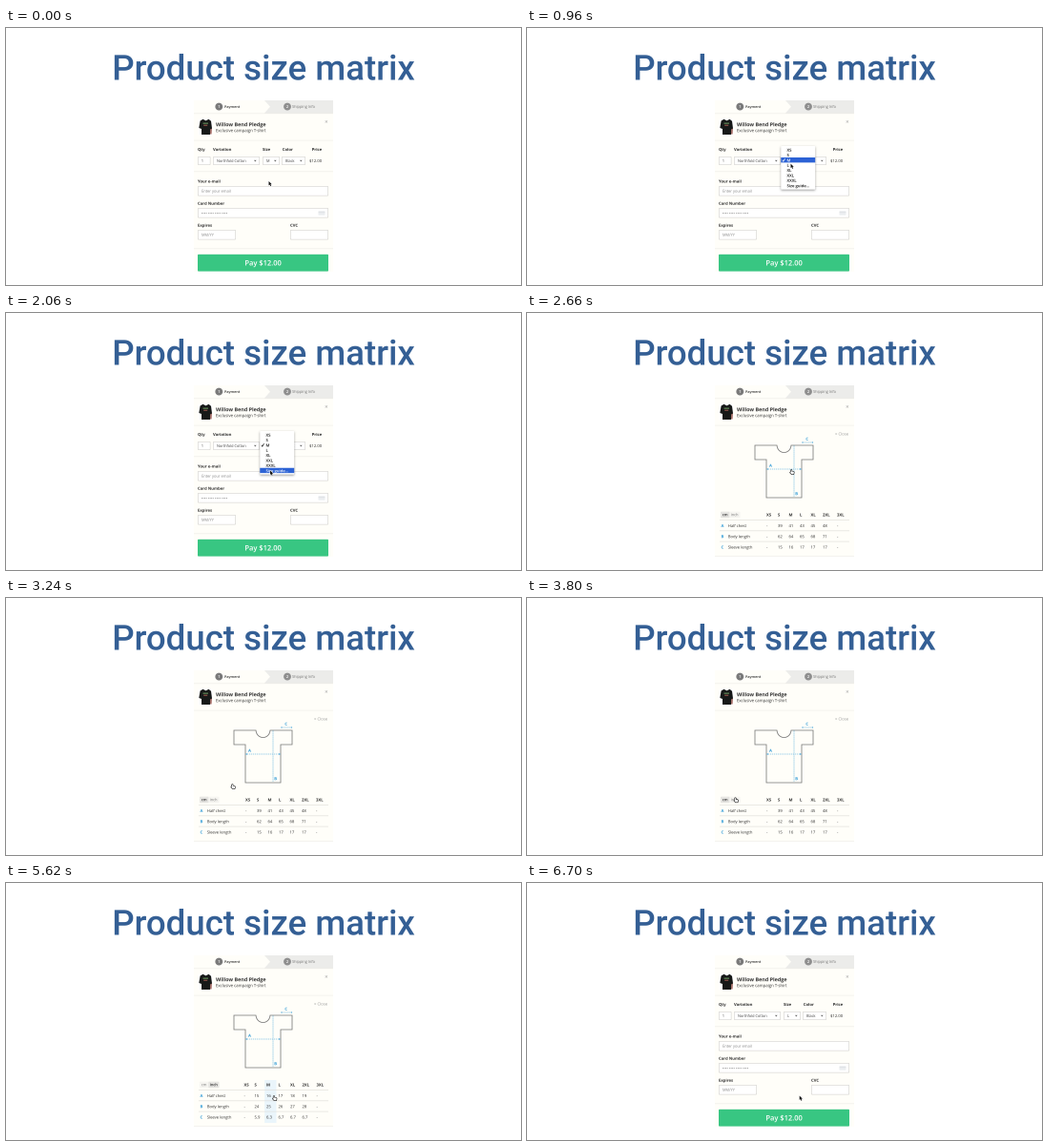
Animation of 540 by 270 pixels, one loop 6720 ms. Source, as an HTML page with a canvas:

```html
<!DOCTYPE html>
<html lang="en">
<head>
<meta charset="utf-8">
<title>Product size matrix</title>
<style>
html, body { margin: 0; width: 100%; height: 100%; overflow: hidden; background: #fff; }
canvas { display: block; }
</style>
</head>
<body>
<canvas id="stage" width="540" height="270"></canvas>
<script>
// Everything is drawn four times larger and reduced, which keeps the tiny text soft and even.
const SCALE = 4;
const stage = document.getElementById('stage').getContext('2d');
const large = document.createElement('canvas');
large.width = 540 * SCALE;
large.height = 270 * SCALE;
const ctx = large.getContext('2d');
ctx.scale(SCALE, SCALE);
stage.imageSmoothingQuality = 'high';

const LOOP = 6720, OPEN_LIST = 720, OPEN_GUIDE = 2300, TO_INCH = 4300, CLOSE_GUIDE = 6240;
const INK = '#303030', GREY = '#858585', LINE = '#d9d8d5', RULE = '#eeece7', CREAM = '#fffef9', BLUE = '#2f9bd8';

// Cursor tip: time, x, y
const PATH = [
  [0, 275.5, 161], [180, 276, 160], [620, 277.5, 139], [800, 277, 140], [960, 276.5, 142.6],
  [1380, 277, 145], [1980, 277, 165.5], [2480, 277, 165.5], [2660, 276.5, 164.8],
  [2800, 276, 165], [3440, 225, 205], [3700, 217.8, 210], [4350, 217.8, 210],
  [4760, 240, 222], [5400, 269, 224], [5620, 280.3, 223.8], [5980, 285.7, 223.5], [LOOP, 285.7, 223.5]
];

const LIST = ['XS', 'S', 'M', 'L', 'XL', 'XXL', 'XXXL', 'Size guide...'];
const HEADS = ['XS', 'S', 'M', 'L', 'XL', '2XL', '3XL'];
const ROWS = ['Half chest', 'Body length', 'Sleeve length'];
const UNITS = {
  cm: {
    cols: [251, 263, 274.5, 286, 297.5, 310, 325],
    rows: ['- 39 41 43 45 48 -', '- 62 64 65 68 71 -', '- 15 16 17 17 17 -']
  },
  inch: {
    cols: [249.5, 260.5, 273, 285.5, 298, 310.5, 325.5],
    rows: ['- 15 16 17 18 19 -', '- 24 25 26 27 28 -', '- 5.9 6.3 6.7 6.7 6.7 -']
  }
};

// Laying text out at ten times its size keeps the advances exact.
function text(str, x, y, size = 4.1, color = INK, weight = 400, align = 'left', family = 'Open Sans') {
  ctx.save();
  ctx.translate(x, y);
  ctx.scale(.1, .1);
  ctx.font = `${weight} ${size * 10}px "${family}", sans-serif`;
  ctx.textAlign = align;
  ctx.fillStyle = color;
  ctx.fillText(str, 0, 0);
  ctx.restore();
}
const bold = (str, x, y, color = INK) => text(str, x, y, 4.2, color, 700);

function rect(x, y, w, h, color, r = 0) {
  ctx.fillStyle = color;
  ctx.beginPath();
  ctx.roundRect(x, y, w, h, r);
  ctx.fill();
}
const rule = y => rect(197, y, 146, .6, RULE);

function shape(d, fill, stroke, width = 1, dash = []) {
  const p = new Path2D(d);
  ctx.lineWidth = width;
  ctx.setLineDash(dash);
  if (stroke) { ctx.strokeStyle = stroke; ctx.stroke(p); }
  if (fill) { ctx.fillStyle = fill; ctx.fill(p); }
  ctx.setLineDash([]);
}

function box(x, y, w, h) {
  rect(x, y, w, h, LINE, 1);
  rect(x + .7, y + .7, w - 1.4, h - 1.4, '#fff', .6);
}

function select(x, w, value) {
  box(x, 135, w, 9);
  text(value, x + 4, 141, 3.85, '#444');
  shape(`M${x + w - 6} 138.8h2.6l-1.3 1.7z`, '#666');
}

function badge(n, x, color) {
  ctx.fillStyle = color;
  ctx.beginPath();
  ctx.arc(x, 82.6, 3.9, 0, 7);
  ctx.fill();
  text(n, x, 84.1, 4, '#fff', 600, 'center');
}

function photo() {
  rect(201.5, 95.5, 15, 17, '#fff');
  shape('M212 105H216L215.6 111.5H212.5z', '#a8716a');
  shape('M206.5 95.8L203.6 97.5 202.3 105 205 106V112H214V106.5L216 105.5 215 97.8 212.5 95.8 209.5 97.4z', '#171918');
  rect(206.5, 99.5, 5.5, 1.4, '#55774c');
  rect(207.2, 101.6, 4, 1.4, '#7b4a40');
}

function header() {
  text('Product size matrix', 270, 54.4, 36.6, '#345f95', 500, 'center', 'Roboto');
  rect(197, 76, 146, 180, CREAM);
  shape('M271 76H343V89.5H271L277 82.7z', '#ececea');
  rule(89.5);
  badge('1', 223.3, '#7a7a7a');
  text('Payment', 229, 84.1, 3.8, INK, 600);
  badge('2', 295, '#8f8f8f');
  text('Shipping Info', 300, 84.1, 3.9, '#777');
  photo();
  text('Willow Bend Pledge', 220, 103.2, 5.4, '#333', 700);
  text('Exclusive campaign T-shirt', 220, 109.2, 4.3);
  text('×', 334.2, 100.6, 6, '#999');
  rule(117.8);
}

function form(size) {
  [['Qty', 201, 129], ['Variation', 217, 129], ['Size', 269, 129], ['Color', 289.8, 129],
   ['Price', 320.7, 129], ['Your e-mail', 201, 162.5], ['Card Number', 201, 185.7],
   ['Expires', 201, 208.8], ['CVC', 298, 208.8]].forEach(l => bold(...l));
  box(201, 135, 13.5, 9);
  text('1', 204.8, 141, 3.9, '#444');
  select(217, 49, 'Northfold Cotton');
  select(269, 18, size);
  select(289, 25, 'Black');
  text('$12.00', 318, 141, 4.2);
  rule(150.5);

  box(201, 166, 137, 10.5);
  text('Enter your email', 205, 172.7, 4, GREY);
  box(201, 189, 137, 10.5);
  for (let i = 0; i < 16; i++) rect(205 + i * 1.55 + (i >> 2) * .9, 194.1, 1, 1, '#8a8a8a', .5);
  rect(327.5, 192.2, 7, 4.5, '#eceef1', .6);
  rect(327.5, 193.2, 7, .9, '#dde0e4');
  box(201, 212, 40, 10.5);
  text('MM/YY', 205, 218.7, 3.9, GREY);
  box(298, 212, 40, 10.5);

  rule(231.5);
  rect(201, 237.8, 137, 17.8, '#38c682', 1);
  text('Pay $12.00', 269.6, 249.4, 7.5, '#fff', 600, 'center');
}

function dropdown(y) {
  const pitch = 5.35, top = 125.3;
  const active = Math.max(2, Math.min(7, Math.floor((y - 2 - top) / pitch)));
  ctx.save();
  ctx.shadowColor = 'rgba(0,0,0,.4)';
  ctx.shadowBlur = 2.5 * SCALE;
  ctx.shadowOffsetY = SCALE;
  rect(266.3, 124, 35.9, 45.6, '#fff', .8);
  ctx.restore();
  rect(266.3, top + active * pitch, 35.9, pitch, '#2c62d5');
  LIST.forEach((item, i) => {
    const color = i === active ? '#fff' : '#111';
    const base = top + i * pitch + 4.4;
    text(item, 272.5, base, 4.2, color, 600);
    if (i === 2) shape(`M267.8 ${base - 1.6}l1 1.4 1.7-3`, null, color, .7);
  });
}

function shirt() {
  shape('M239 139H262C263 149 276 149 277 139H300V154H288V194H251V154H239z', null, '#777', .8);
  shape('M251 164H288M280 139.5V193.5M288.5 136H300', null, BLUE, .55, [1.2, .8]);
  shape('M251.3 164l1.5-.9v1.8zM287.7 164l-1.5-.9v1.8zM288 136l1.4-.9v1.8zM300.3 136l-1.4-.9v1.8z', BLUE);
  bold('A', 254, 161.8, BLUE);
  bold('B', 281.2, 191.2, BLUE);
  bold('C', 292.3, 133.8, BLUE);
}

function guide(unit, x, y) {
  const { cols, rows } = UNITS[unit];
  const inch = unit === 'inch';
  text('× Close', 323, 128.6, 4.2, '#999');
  shirt();

  const col = Math.floor((x - 246.3) / 12.4);
  if (inch && y > 217 && col >= 0) rect(246.3 + col * 12.4, 207, 12.4, 45, '#eaf5fb');

  rect(203, 208.7, 20.5, 6.6, '#f6f5f1', 1);
  rect(inch ? 212.3 : 203, 208.7, inch ? 11.2 : 9.3, 6.6, '#e6e5e2', 1);
  text('cm', 204.9, 213.3, 3.9, inch ? '#777' : INK, inch ? 400 : 600);
  text('inch', 213.8, 213.3, 3.9, inch ? INK : '#777', inch ? 600 : 400);
  HEADS.forEach((h, i) => bold(h, cols[i], 213.5));

  ROWS.forEach((label, r) => {
    const base = 225 + r * 11.2;
    rect(202, 217.2 + r * 11.3, 136, .6, '#dddcd8');
    bold('ABC'[r], 203.5, base, BLUE);
    text(label, 210.8, base, 4.15);
    rows[r].split(' ').forEach((v, i) => text(v, cols[i], base, 4.2));
  });
  rule(255.2);
}

function cursor(x, y, hand) {
  ctx.save();
  ctx.translate(x, y);
  if (hand) {
    ctx.scale(.78, .78);
    shape('M.3.4Q.9-.2 1.4.4V2.2L4 2.8Q4.5 3 4.3 4L3.8 5.8H1.3L-.7 3.7Q-.6 2.8.3 3.3z', '#fff', '#222', 1.6);
  } else {
    shape('M0 0V4.4L1 3.6 1.8 5.3 2.6 4.9 1.8 3.2H3.2z', '#111', '#fff', .8);
  }
  ctx.restore();
}

function cursorAt(t) {
  const i = PATH.findIndex(p => p[0] > t);
  const [t0, x0, y0] = PATH[i - 1], [t1, x1, y1] = PATH[i];
  const u = (t - t0) / (t1 - t0), e = u * u * (3 - 2 * u);
  return [x0 + (x1 - x0) * e, y0 + (y1 - y0) * e];
}

function draw(now) {
  const t = now % LOOP, [x, y] = cursorAt(t);
  const inGuide = t >= OPEN_GUIDE && t < CLOSE_GUIDE;
  rect(0, 0, 540, 270, '#fff');
  header();
  if (inGuide) guide(t < TO_INCH ? 'cm' : 'inch', x, y);
  else form(t < CLOSE_GUIDE ? 'M' : 'L');
  if (t >= OPEN_LIST && t < OPEN_GUIDE) dropdown(y);
  cursor(x, y, inGuide);
  stage.drawImage(large, 0, 0, 540, 270);
}

function frame() {
  draw(performance.now());
  requestAnimationFrame(frame);
}
frame();
</script>
</body>
</html>
```
